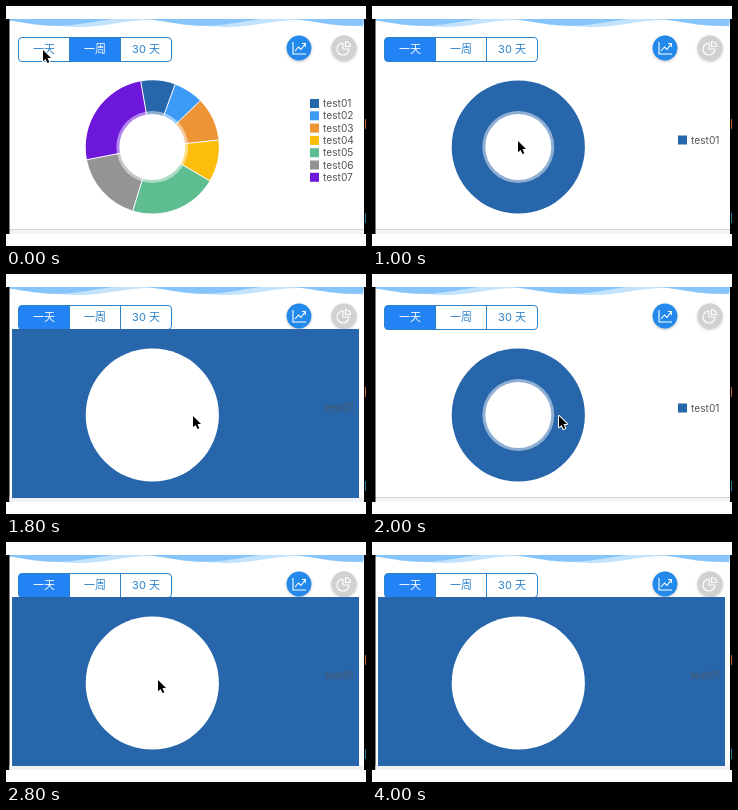
These frames come from a looping animation (360x240 px, 4800 ms). An HTML page with a canvas:

```html
<!DOCTYPE html>
<html lang="zh-CN">
<head>
<meta charset="utf-8">
<style>
html, body { margin: 0; width: 100%; height: 100%; overflow: hidden; background: #fff; }
canvas { display: block; width: 360px; height: 240px; }
</style>
</head>
<body>
<canvas id="stage"></canvas>
<script>
const canvas = document.getElementById('stage');
const ratio = window.devicePixelRatio || 1;
canvas.width = 360 * ratio;
canvas.height = 240 * ratio;
const g = canvas.getContext('2d');
g.scale(ratio, ratio);

const LOOP = 4800, STEP = 200;
const BLUE = '#2766aa', TAB = '#2382f4', LINE = '#2c82c9';
const CX = 146.3, CY = 141, R = 66.6;
const CJK = 'Inter, "Noto Sans CJK SC", "Noto Sans CJK", "Noto Sans CJK JP", sans-serif';
const LABEL = '10.2px Inter, sans-serif';
const rad = d => d * Math.PI / 180;

const COLORS = [BLUE, '#3d9bf7', '#ec9436', '#fcbd0c', '#5fbe91', '#949494', '#6d17db'];
const EDGES = [-100, -70, -44, -6, 30.5, 107, 169, 260];

// cursor tip, one pair per step; the pointer is gone after the last
const PATH = [[37, 44], [52, 52], [193, 108], [203, 128], [209, 148], [146, 135],
  [146, 135], [160, 138], [180, 141], [187, 142], [187, 142], [186, 150], [178, 161],
  [152, 138], [152, 138], [115, 100], [80, 61], [115, 66], [150, 72], [243, 60]];

function rect(x, y, w, h, color) {
  g.fillStyle = color;
  g.fillRect(x, y, w, h);
}

function round(x, y, w, h, r) {
  g.beginPath();
  g.moveTo(x + r, y);
  g.arcTo(x + w, y, x + w, y + h, r);
  g.arcTo(x + w, y + h, x, y + h, r);
  g.arcTo(x, y + h, x, y, r);
  g.arcTo(x, y, x + w, y, r);
  g.closePath();
}

function disc(x, y, r, color) {
  g.fillStyle = color;
  g.beginPath();
  g.arc(x, y, r, 0, Math.PI * 2);
  g.fill();
}

function poly(points) {
  g.beginPath();
  points.forEach(p => g.lineTo(p[0], p[1]));
}

function text(str, x, y, font, color, align) {
  g.font = font;
  g.fillStyle = color;
  g.textAlign = align;
  g.textBaseline = 'middle';
  g.fillText(str, x, y);
}

function wave(color, base, amp, peak) {
  g.fillStyle = color;
  g.beginPath();
  g.moveTo(3, 13);
  for (let x = 3; x <= 358; x += 2) {
    g.lineTo(x, Math.max(13, base + amp * Math.cos((x - peak) * Math.PI * 2 / 148)));
  }
  g.lineTo(358, 13);
  g.fill();
}

function frame() {
  rect(0, 0, 360, 240, '#fff');
  wave('#c3e3fd', 17.5, 3.5, 72);
  wave('#86c5fa', 16, 3.8, 50);
  rect(3, 223, 355, 5, '#f4f4f5');
  rect(3, 223, 355, 1, '#d5d5d7');
  rect(0, 13, 3.5, 215, '#000');
  rect(358, 13, 2, 215, '#000');
  rect(359, 113, 1, 10, '#b8632a');
  rect(359, 207, 1, 10, '#1d7f9b');
}

function tabs(active) {
  const xs = [12.5, 63.5, 114.5, 165.5];
  g.save();
  round(12.5, 31.5, 153, 24, 3.5);
  g.clip();
  rect(xs[active], 31, xs[active + 1] - xs[active], 25, TAB);
  g.restore();
  g.strokeStyle = LINE;
  g.lineWidth = 1;
  round(12.5, 31.5, 153, 24, 3.5);
  g.stroke();
  for (const x of [63.5, 114.5]) {
    poly([[x, 31.5], [x, 55.5]]);
    g.stroke();
  }
  ['一天', '一周', '30 天'].forEach((s, i) =>
    text(s, (xs[i] + xs[i + 1]) / 2, 44, '11px ' + CJK, i === active ? '#fff' : LINE, 'center'));
}

function badge(x, color) {
  g.save();
  g.shadowColor = 'rgba(0,0,0,.25)';
  g.shadowBlur = 3 * ratio;
  g.shadowOffsetY = ratio;
  disc(x, 42, 12.4, color);
  g.restore();
  g.strokeStyle = '#fff';
  g.lineWidth = 1.1;
}

function icons() {
  badge(293, '#2389ea');
  poly([[287, 36], [287, 48], [300, 48]]);
  g.stroke();
  poly([[289, 45], [292.5, 41], [295, 43.5], [299, 38]]);
  g.stroke();
  poly([[296, 37.5], [299.3, 37.5], [299.3, 41]]);
  g.stroke();

  badge(338, '#d1d1d1');
  g.beginPath();
  g.arc(337, 43, 6, 0, Math.PI * 1.5);
  g.lineTo(337, 43);
  g.closePath();
  g.stroke();
  g.beginPath();
  g.moveTo(339.5, 40.5);
  g.arc(339.5, 40.5, 5, -Math.PI / 2, 0);
  g.closePath();
  g.stroke();
}

function slice(from, to, color) {
  g.fillStyle = color;
  g.beginPath();
  g.moveTo(CX, CY);
  g.arc(CX, CY, R, rad(from), rad(to));
  g.closePath();
  g.fill();
}

function hole() {
  disc(CX, CY, 36, 'rgba(255,255,255,.48)');
  disc(CX, CY, 33, '#fff');
}

function legend(x, y, i) {
  rect(x, y - 4.5, 9, 9, COLORS[i]);
  text('test0' + (i + 1), x + 13, y + .5, LABEL, '#555', 'left');
}

function weekChart() {
  COLORS.forEach((c, i) => slice(EDGES[i], EDGES[i + 1], c));
  g.strokeStyle = '#fff';
  g.lineWidth = 1;
  EDGES.slice(1).forEach(a => {
    poly([[CX, CY], [CX + R * Math.cos(rad(a)), CY + R * Math.sin(rad(a))]]);
    g.stroke();
  });
  hole();
  COLORS.forEach((c, i) => legend(304, 97.5 + i * 12.3, i));
}

function dayChart(sweep) {
  if (sweep >= 360) disc(CX, CY, R, BLUE);
  else slice(-100, sweep - 100, BLUE);
  hole();
  legend(306, 134, 0);
}

function invertedChart() {
  rect(3.5, 223, 354.5, 5, '#f1f2f6');
  rect(6, 55, 347, 169, BLUE);
  disc(CX, CY, R, '#fff');
  text('test01', 319, 134, LABEL, '#4b5966', 'left');
}

function toast() {
  g.fillStyle = 'rgba(0,0,0,.05)';
  round(129, 87, 104, 84, 7);
  g.fill();
  g.fillStyle = 'rgba(24,24,24,.9)';
  round(143, 92, 76, 74, 7);
  g.fill();
  disc(181, 122, 12.2, '#fff');
  g.strokeStyle = '#262626';
  g.lineWidth = 3;
  poly([[175, 122], [179.3, 126], [187, 118]]);
  g.stroke();
  text('加载成功', 181, 143.5, '600 10.2px ' + CJK, '#fff', 'center');
}

function pointer(x, y) {
  const shape = [[0, 0], [0, 11.2], [2.6, 8.9], [4.5, 13], [6.3, 12.2], [4.5, 8.1], [8, 7.9]];
  poly(shape.map(p => [x + p[0], y + p[1]]));
  g.closePath();
  g.lineJoin = 'round';
  g.strokeStyle = '#fff';
  g.lineWidth = 2;
  g.stroke();
  g.fillStyle = '#000';
  g.fill();
  g.lineJoin = 'miter';
}

function draw(ms) {
  const step = Math.floor(ms / STEP);
  const t = step * STEP;
  const inverted = (t >= 1200 && t < 2000) || (t >= 2800 && t < 3200) || t >= 4000;
  const sweep = { 400: 28, 600: 165, 800: 340 }[t] || 360;

  frame();
  tabs(t > 0 ? 0 : 1);
  icons();
  if (t < 400) weekChart();
  else if (inverted) invertedChart();
  else dayChart(sweep);
  if (t === 400) toast();
  if (PATH[step]) pointer(...PATH[step]);
}

const start = performance.now();
function tick() {
  draw((performance.now() - start) % LOOP);
  requestAnimationFrame(tick);
}
tick();
</script>
</body>
</html>
```
